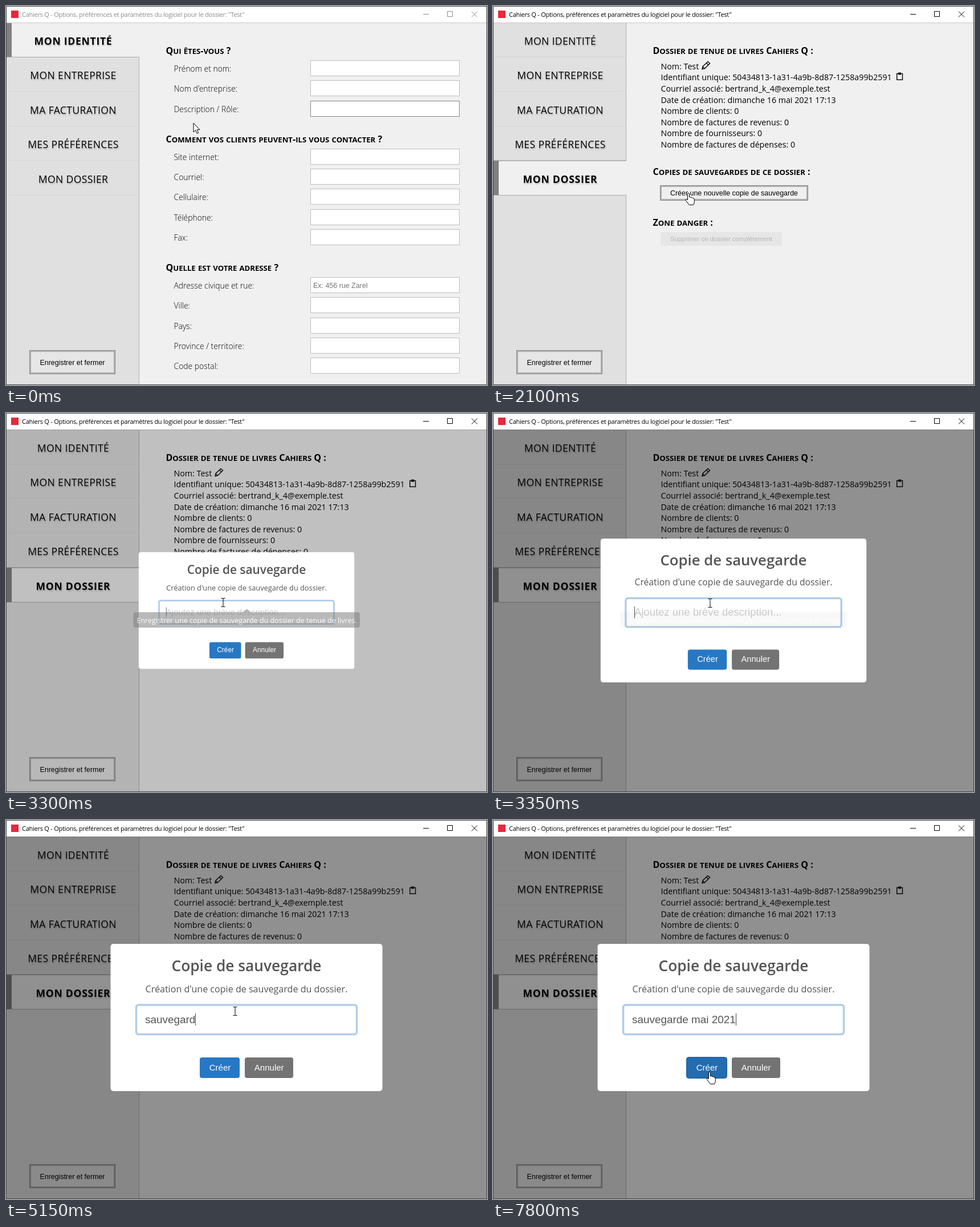
Recreate the animation shown at these times as an HTML page. Size 844 by 664 pixels, loop 8000 ms.

```html
<!DOCTYPE html>
<html lang="fr">
<head>
<meta charset="utf-8">
<title>Copie de sauvegarde</title>
<style>
html, body { margin: 0; width: 100%; height: 100%; overflow: hidden; background: #f0f0f0; }
svg { display: block; width: 844px; height: 664px; }
text { font: 14.22px "Open Sans", "Noto Sans", sans-serif; white-space: pre; }
.title { font-size: 11px; letter-spacing: -.25px; }
.light { font-size: 13.9px; font-weight: 300; }
.head { font-size: 16px; font-weight: 700; }
.head tspan { font-size: 13.15px; }
.menu { font-size: 17.5px; letter-spacing: .4px; filter: drop-shadow(1px 2px 1px rgba(0,0,0,.22)); }
.on { font-weight: 700; letter-spacing: .75px; }
.btn { font: 12.45px "Liberation Sans", Arial, sans-serif; }
.off { font-size: 11.2px; }
.tip { font-size: 12.5px; }
.big { font: 600 26.3px "Open Sans", "Noto Sans", sans-serif; }
.sub { font-size: 16.1px; }
.input { font: 18.9px "Liberation Sans", Arial, sans-serif; }
.cta { font: 15px "Liberation Sans", Arial, sans-serif; }
.mid { text-anchor: middle; }
</style>
</head>
<body>
<svg id="stage" viewBox="0 0 844 664"></svg>
<script>
const LOOP = 8000, STEP = 50;
const text = (x, y, s, cls = '', fill = '#000', more = '') =>
  `<text x="${x}" y="${y}" class="${cls}" fill="${fill}" ${more}>${s}</text>`;
const rect = (x, y, w, h, fill, more = '') =>
  `<rect x="${x}" y="${y}" width="${w}" height="${h}" fill="${fill}" ${more}/>`;
const heading = (y, s) => text(280.5, y,
  s.replace(/[a-zà-ÿ]+/g, m => `<tspan>${m.toUpperCase()}</tspan>`), 'head');
// double border: two thin lines with a gap
const button = (x, y, w, h, fill, label) =>
  rect(x + .5, y + .5, w - 1, h - 1, fill, 'stroke="#808080"') +
  rect(x + 1.5, y + 1.5, w - 3, h - 3, 'none', 'stroke="#bdbdbd"') +
  rect(x + 2.5, y + 2.5, w - 5, h - 5, 'none', 'stroke="#a8a8a8"') +
  text(x + w / 2, y + h / 2 + 4.5, label, 'btn mid');

const items = ['MON IDENTITÉ', 'MON ENTREPRISE', 'MA FACTURATION', 'MES PRÉFÉRENCES', 'MON DOSSIER'];
const itemTop = i => Math.floor(29 + 60.4 * i);

function menu(active) {
  const top = itemTop(active), end = itemTop(active + 1);
  let out = rect(1, top, 233, end - top, '#f0f0f0');
  for (let i = 1; i < 6; i++) out += rect(1, itemTop(i), 232, 1, '#d5d5d5');
  if (active) out += rect(1, top, 233, 2, '#b4b4b4');
  out += rect(1, top + 1, 9, end - top - 1, '#808080') +
    rect(1, end, 233, 1, '#aaa') + rect(233, end, 1, 663 - end, '#b0b0b0') +
    rect(233, 29, 1, top - 29, '#b0b0b0');
  items.forEach((s, i) => out += text(118, 67.6 + 60.5 * i, s, 'menu mid' + (i == active ? ' on' : '')));
  return out;
}

function fields(y, labels) {
  return labels.map((s, i) => {
    const top = Math.round(y + 35.3 * i);
    return rect(534.5, top + .5, 261, 27, '#fff', 'stroke="#bcbcbc"') + text(294.5, top + 20, s, 'light');
  }).join('');
}

const identity = menu(0) +
  heading(84, 'Qui êtes-vous ?') +
  fields(95, ['Prénom et nom:', "Nom d'entreprise:", 'Description / Rôle:']) +
  heading(239, 'Comment vos clients peuvent-ils vous contacter ?') +
  fields(249.6, ['Site internet:', 'Courriel:', 'Cellulaire:', 'Téléphone:', 'Fax:']) +
  heading(464, 'Quelle est votre adresse ?') +
  fields(475, ['Adresse civique et rue:', 'Ville:', 'Pays:', 'Province / territoire:', 'Code postal:']) +
  text(539, 494, 'Ex: 456 rue Zarel', 'btn', '#757575') +
  rect(534.5, 166.5, 261, 27, 'none', 'id="focused" stroke="#858585"');

const folder = menu(4) +
  heading(84, 'Dossier de tenue de livres Cahiers Q :') +
  ['Nom: Test', 'Identifiant unique: 50434813-1a31-4a9b-8d87-1258a99b2591',
    'Courriel associé: bertrand_k_4@exemple.test', 'Date de création: dimanche 16 mai 2021 17:13',
    'Nombre de clients: 0', 'Nombre de factures de revenus: 0', 'Nombre de fournisseurs: 0',
    'Nombre de factures de dépenses: 0'
  ].map((s, i) => text(294.5, 110.7 + 19.6 * i, s)).join('') +
  `<g fill="none" stroke="#111" stroke-width="1.5">
    <path d="M367 110.5L368 106L377 97.5L380.5 100.5L371.5 109.5ZM374.5 100L378 103.5M368 106.5L371 109.5"/>
    <path d="M711 118.5H708.7V129.3H718.5V118.5H716"/></g>` +
  rect(711, 116.5, 5, 4, '#111') +
  heading(296, 'Copies de sauvegardes de ce dossier :') +
  button(293, 314, 260, 27, '#efefef', 'Créer une nouvelle copie de sauvegarde') +
  `<g id="ring">${rect(293, 314, 260, 27, 'none', 'rx="1" stroke="#000" stroke-opacity=".2" stroke-width="5"')}
    ${rect(293, 314, 260, 27, 'none', 'rx="1" stroke="#2a2a2a" stroke-width="2"')}</g>` +
  heading(385, 'Zone danger :') +
  rect(294, 396, 213, 24, '#e6e6e6', 'rx="2"') +
  text(400.5, 411.5, 'Supprimer ce dossier complètement', 'btn off mid', '#b5b5b5');

const modal = rect(183.5, 217, 477, 258, '#fff', 'rx="5"') +
  text(422, 265, 'Copie de sauvegarde', 'big mid', '#545454') +
  text(422, 301.5, "Création d'une copie de sauvegarde du dossier.", 'sub mid', '#545454') +
  rect(228.5, 324, 387, 51.5, '#fff', 'rx="4" stroke="#b1cde7" stroke-width="3.5"') +
  text(244, 355.5, 'Ajoutez une brève description...', 'input', '#ccc', 'id="hint"') +
  text(244, 355.5, '', 'input', '#545454', 'id="typed"') +
  rect(0, 339, 1, 21, '#444', 'id="caret"') +
  rect(340, 416, 70, 36, '#2778c4', 'rx="4"') +
  rect(339.5, 415.5, 71, 37, '#236cb0', 'id="hot" rx="4" stroke="#1d5c97"') +
  text(375.5, 438.5, 'Créer', 'cta mid', '#fff') +
  rect(419, 416, 85, 36, '#737373', 'rx="4"') +
  text(461.7, 438.5, 'Annuler', 'cta mid', '#fff');

const $ = id => document.getElementById(id);
$('stage').innerHTML =
  rect(0, 0, 844, 664, '#f0f0f0') + rect(1, 29, 232, 634, '#e0e0e0') +
  rect(1, 0, 232, 60, '#e8e8e8', 'id="hover"') +
  `<g id="identity">${identity}</g><g id="folder">${folder}</g>` +
  button(41, 603, 151, 42, '#e6e6e6', 'Enregistrer et fermer') +
  rect(0, 0, 844, 29, '#fff') + rect(0, 29, 844, 1, '#c8c8c8') +
  rect(9, 8, 13, 13, '#e8283c') +
  text(28, 18.5, 'Cahiers Q - Options, préférences et paramètres du logiciel pour le dossier: "Test"', 'title', '#000', 'id="caption"') +
  `<path id="controls" fill="none" d="M732 14.5H742M774.5 9.5H783.5V18.5H774.5ZM817 9.5L827 19.5M827 9.5L817 19.5"/>` +
  rect(1, 29, 842, 634, '#000', 'id="shade"') +
  `<g id="modal">${modal}</g>` +
  `<g id="tip"><path d="M416.5 349L422.5 343L428.5 349Z" fill="#808080"/>
    ${rect(223.5, 349, 397.5, 27, '#808080', 'rx="4"')}
    ${text(422.5, 368, 'Enregistrer une copie de sauvegarde du dossier de tenue de livres.', 'tip mid', '#fff')}</g>` +
  rect(.5, .5, 843, 663, 'none', 'stroke="#484848"') +
  `<path id="cursor" stroke="#000" stroke-linejoin="round"/>`;

const shapes = {
  arrow: 'M0 0V16L3.7 12.7L6.2 18.3L8.6 17.3L6.2 11.7H11Z',
  hand: 'M-1.5 1.5Q0 -.5 1.5 1.5V8Q3.5 6.8 4.7 8.8Q6.8 7.8 7.7 9.8Q10.3 9.3 10.3 12V16Q10.3 19 8.5 21.5H1.2Q-1 18.5 -4.6 13.5Q-5 10.8 -2.9 11.3L-1.5 12.8Z',
  beam: 'M-3.5 -7.5H-1Q0 -7.5 0 -6.5Q0 -7.5 1 -7.5H3.5M0 -6.5V6.5M-3.5 7.5H-1Q0 7.5 0 6.5Q0 7.5 1 7.5H3.5'
};
// time, x, y of the pointer
const path = [[0, 329, 205], [500, 165, 304], [1600, 165, 304], [2100, 343, 327], [2450, 379, 331],
  [2850, 379, 331], [2900, 380, 331], [3250, 380, 331], [3350, 381, 333], [3800, 402, 335],
  [7000, 402, 335], [7050, 402, 336], [7200, 402, 336], [7800, 380, 441], [8000, 380, 441]];
const phrase = 'sauvegarde mai 2021';
const keys = [4100, 4200, 4400, 4550, 4650, 4700, 4800, 5000, 5150, 5300, 5400, 5550, 5650, 5700,
  5900, 6000, 6200, 6300, 6400];

const clamp = v => Math.min(1, Math.max(0, v));
const ramp = (t, a, b) => clamp((t - a) / (b - a));
const ease = p => 1 - (1 - p) ** 2.3;
const show = (id, on) => $(id).style.display = on ? '' : 'none';
const within = (x, y, l, t, r, b) => x >= l && x <= r && y >= t && y <= b;

function pointer(t) {
  const i = path.findIndex(k => k[0] > t);
  const [a, b] = [path[i - 1], path[i]];
  let p = ramp(t, a[0], b[0]);
  p = p * p * (3 - 2 * p);
  return [1, 2].map(n => Math.round(a[n] + (b[n] - a[n]) * p));
}

function popScale(t) {
  const p = ramp(t, 3283, 3583);
  if (p < .45) return .7 + .35 * ease(p / .45);
  if (p < .8) return 1.05 - .1 * ease((p - .45) / .35);
  return .95 + .05 * ease((p - .8) / .2);
}

function draw(t) {
  const [x, y] = pointer(t);
  const open = t >= 3283, second = t >= 1050;
  show('identity', !second);
  show('folder', second);
  $('focused').style.opacity = 1 - ramp(t, 0, 200);
  const item = x < 233 ? Math.floor((y - 29) / 60.4) : -1;
  show('hover', item >= 0);
  if (item >= 0) $('hover').setAttribute('y', itemTop(item));
  const ink = t < 950 ? '#8a8a8a' : '#000';
  $('caption').setAttribute('fill', ink);
  $('controls').setAttribute('stroke', ink);

  show('ring', t >= 3200 && t < 3300);
  $('shade').style.opacity = .4 * ramp(t, 3250, 3350);
  $('tip').style.opacity = ramp(t, 2300, 2500) * (1 - ramp(t, 3255, 3355));

  show('modal', open);
  $('modal').setAttribute('transform', `translate(422 346) scale(${popScale(t)}) translate(-422 -346)`);
  const count = keys.filter(k => k <= t).length;
  const typed = $('typed');
  typed.textContent = phrase.slice(0, count);
  show('hint', !count);
  show('caret', count ? t < 6950 || t >= 7460 : t < 3800);
  $('caret').setAttribute('x', Math.round(244 + (count && typed.getComputedTextLength())));
  const onCreate = open && within(x, y, 340, 416, 410, 452);
  show('hot', onCreate);

  const onBackup = second && within(x, y, 293, 314, 553, 341);
  let kind = 'arrow';
  if (open && within(x, y, 227, 322, 617, 377)) kind = 'beam';
  else if (onCreate || !open && (x < 233 || onBackup)) kind = 'hand';
  const c = $('cursor');
  c.setAttribute('d', shapes[kind]);
  c.setAttribute('fill', kind == 'beam' ? 'none' : '#fff');
  c.setAttribute('transform', `translate(${x} ${y})`);
}

function tick(now) {
  draw(Math.floor(now % LOOP / STEP) * STEP);
  requestAnimationFrame(tick);
}
draw(0);
requestAnimationFrame(tick);
</script>
</body>
</html>
```
